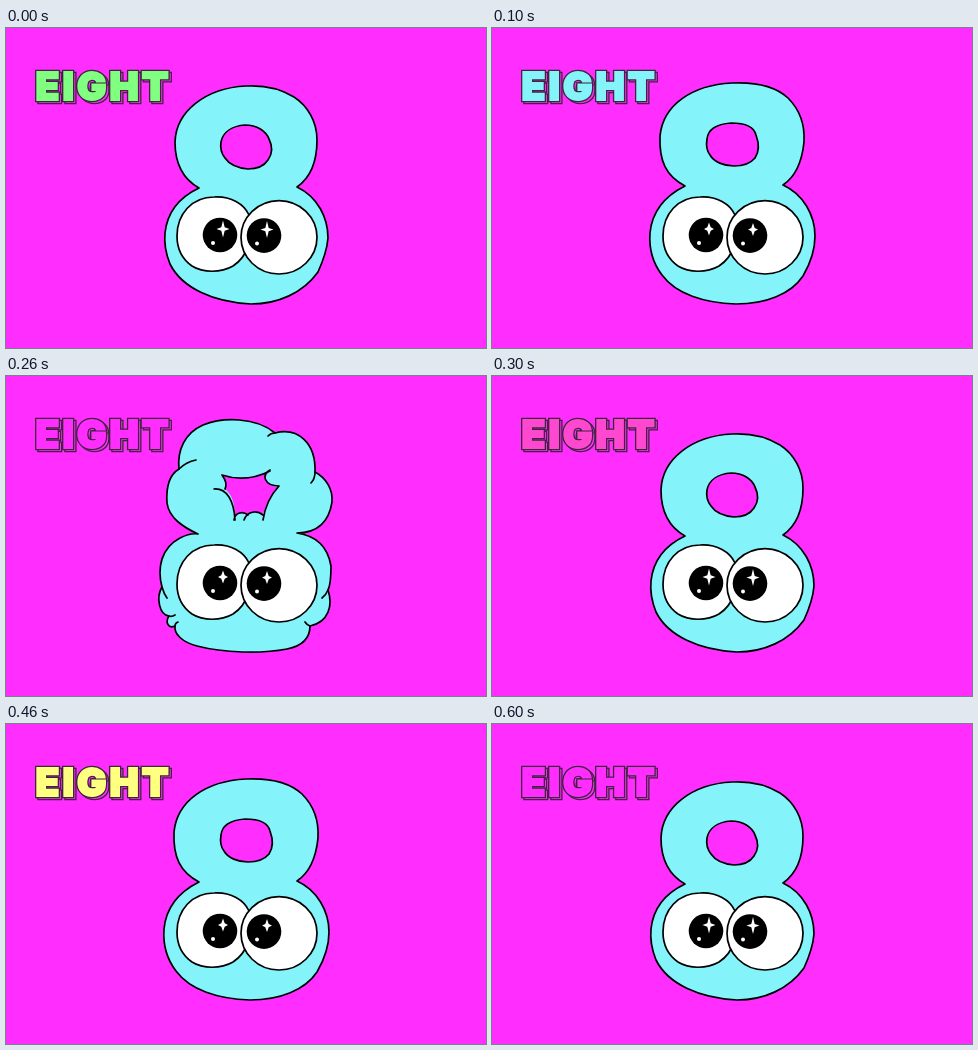
Write an HTML page that moves like this. It is 480 by 320 pixels and loops after 0.7 s.

```html
<!DOCTYPE html>
<html>
<head>
<meta charset="utf-8">
<style>
html, body { margin: 0; width: 100%; height: 100%; overflow: hidden; background: #ff2eff; }
svg { display: block; width: 100vw; height: 100vh; }
.line { fill: none; stroke: #000; stroke-width: 1.7; stroke-linecap: round; stroke-linejoin: round; }
.skin { fill: #84f4fa; }
.hole { fill: #ff2eff; }
.eye { fill: #fff; }
text { font: 900 39px Inter, "Open Sans", sans-serif; letter-spacing: 3.1px; stroke-linejoin: miter; }
.edge { fill: #40233f; stroke: #40233f; stroke-width: 4.6; }
.fill { fill: currentColor; stroke: currentColor; stroke-width: 2; }
</style>
</head>
<body>
<svg viewBox="0 0 480 320">
  <defs>
    <g id="word">
      <text class="edge">EIGHT</text>
      <text class="fill">EIGHT</text>
    </g>
  </defs>
  <use href="#word" x="31.8" y="74.2" color="#ff2eff"/>
  <use href="#word" x="29.5" y="72" id="face"/>

  <g class="pose">
    <path class="line skin" d="M193 160C177 151 169 135 169 114C170 83 200 60 240 58C258 57 275 61 288 69C302 78 311 94 311 112C311 135 304 150 291 159C312 169 322 190 322 210C321 222 317 233 312 244C297 265 272 276 245 276C207 274 176 260 164 236C160 226 158 215 159 205C161 186 172 170 193 160Z"/>
    <path class="line hole" d="M215 114C217 104 226 98 239 97C251 97 260 103 263 111C266 117 267 125 262 132C258 138 251 141 242 141C232 140 223 136 219 130C215 125 214 120 215 114Z"/>
  </g>

  <g class="pose">
    <path class="line skin" d="M193 158C174 148 167 133 168 108C171 77 200 57 240 55C262 54 282 57 296 70C309 83 313 97 312 114C310 134 303 149 291 157C311 166 323 187 323 208C323 222 318 236 311 248C299 266 274 276 244 276C212 275 184 266 170 247C160 234 157 219 158 205C160 184 173 168 193 158Z"/>
    <path class="line hole" d="M215 111C216 101 226 96 239 95C253 95 262 98 264 107C267 115 267 124 263 130C258 136 251 138 242 138C232 138 222 134 218 127C214 122 214 117 215 111Z"/>
  </g>

  <g class="pose">
    <path class="line skin" d="M192 158C177 151 163 142 161 127C160 112 163 99 173 93C171 74 179 57 197 49C217 41 250 41 269 57C292 51 310 67 309 96C320 102 327 113 326 126C323 146 311 157 291 157C312 160 322 172 325 190C325 200 325 208 322 214C327 229 323 246 304 250C304 262 296 270 281 273C255 278 218 277 191 270C176 266 168 258 169 250C162 253 159 246 163 240C153 239 150 221 156 211C151 192 155 172 174 162C180 159 186 157 192 158Z"/>
    <path class="hole" d="M216 99Q240 106 263 96Q256 103 263 108Q268 112 273 110Q262 122 257 138Q247 133 241 139Q236 135 229 140Q229 121 219 113Q222 108 216 99Z"/>
    <path class="line" d="M173 93Q180 86 190 84M269 57Q265 57 262 60M309 96Q309 103 305 107
      M216 99Q240 107 264 95M264 94C255 98 258 110 273 110M273 110Q260 124 257 144
      M216 99Q222 107 219 113M208 113C221 112 228 125 229 144M228 144C229 136 237 135 242 139
      M238 144C241 135 251 134 257 139
      M322 214Q320 219 316 222M304 250Q301 249 299 246M156 211Q158 218 161 222M163 240Q166 241 169 239M169 250Q169 247 172 246"/>
  </g>

  <g class="line">
    <path class="eye" d="M171 208C171 186 186 169 208 169C225 168 238 176 243 187C250 207 241 229 227 238C215 245 197 245 186 238C176 231 171 221 171 208Z"/>
    <ellipse class="eye" cx="273" cy="209.3" rx="38" ry="36.7"/>
  </g>
  <g id="pupil">
    <circle cx="214" cy="207" r="17.3"/>
    <circle cx="207" cy="215" r="2" fill="#fff"/>
    <path class="spark" fill="#fff"/>
  </g>
  <use href="#pupil" x="44" y=".6"/>
</svg>
<script>
const colours = ['#80ff80', '#84f4fa', '#ff2eff', '#ff48d0', '#ffff80', '#84f4fa', '#ff2eff'];
const poses = document.querySelectorAll('.pose');
const face = document.getElementById('face');
const spark = document.querySelector('.spark');

// Four-pointed star around (217, 201)
const star = (w, h) =>
  `M217 ${201 - h}L218.7 199.3L${217 + w} 201L218.7 202.7L217 ${201 + h}L215.3 202.7L${217 - w} 201L215.3 199.3Z`;

function draw(now) {
  const step = Math.floor(now / 100) % 7;
  const pose = step % 3;
  poses.forEach((p, i) => p.style.display = i === pose ? '' : 'none');
  face.setAttribute('color', colours[step]);
  spark.setAttribute('d', pose ? star(5, 6.5) : star(6.5, 8.5));
  requestAnimationFrame(draw);
}
draw(performance.now());
</script>
</body>
</html>
```
